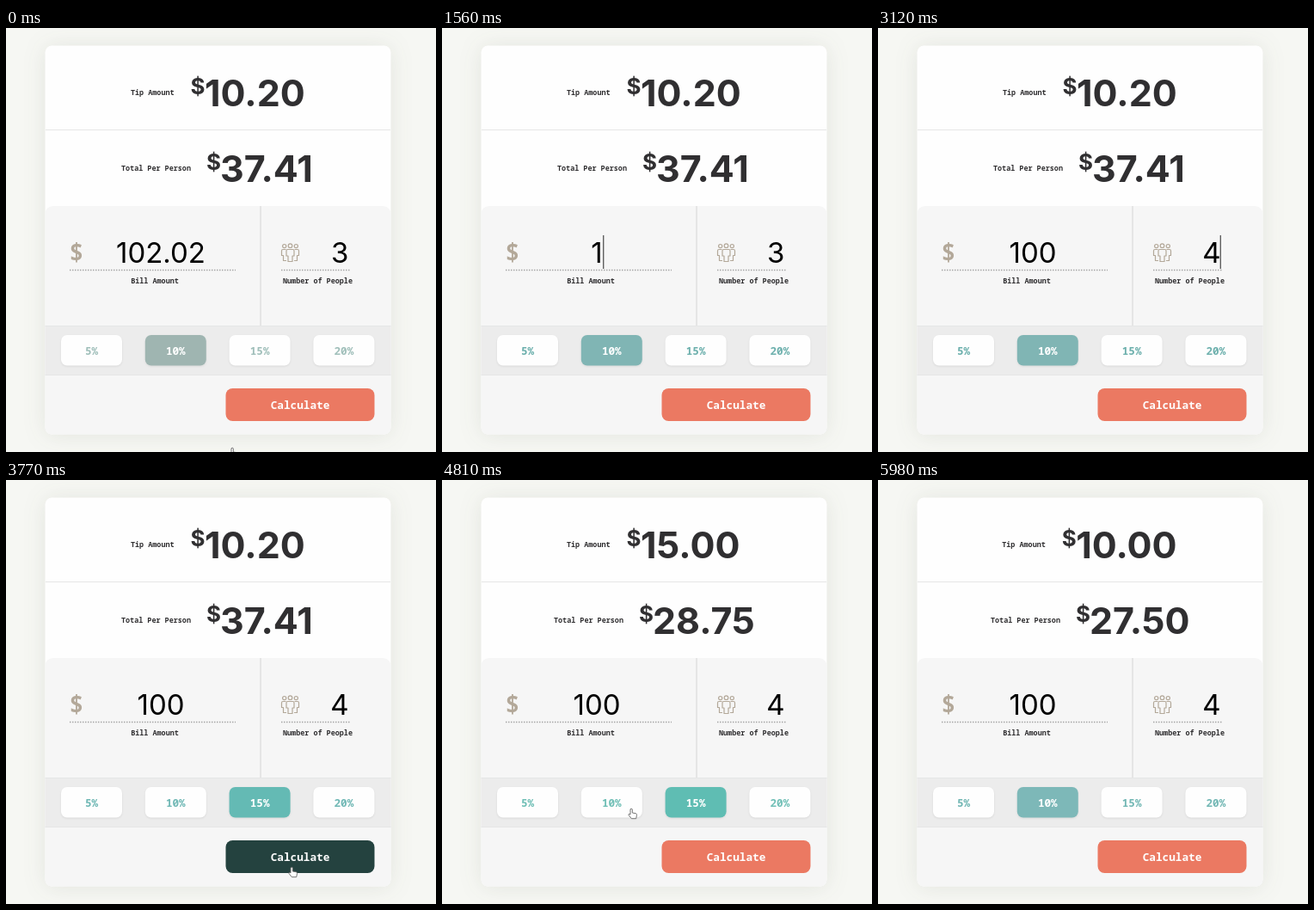
Write an HTML page that moves like this. It is 500 px wide and 493 px high and loops after 6.76 s.

```html
<!DOCTYPE html>
<html lang="en">
<head>
<meta charset="utf-8">
<title>Tip calculator</title>
<style>
  html, body { margin: 0; width: 100%; height: 100%; overflow: hidden; background: #f6f7f3; }
  svg { display: block; width: 100%; height: 100%; }
  text { font-family: "Roboto Mono", "Noto Sans Mono", monospace; font-weight: 700; fill: #302f31; }
  .label { font-size: 8.45px; }
  .sum, .sign, .value { font-family: Inter, sans-serif; }
  .sum { font-size: 43px; }
  .sign { font-size: 26px; }
  .value { font-size: 33px; font-weight: 400; fill: #000; }
  .mid { text-anchor: middle; }
  .end { text-anchor: end; }
  .button { font-size: 12.7px; text-anchor: middle; }
  .card { filter: drop-shadow(0 1px 13px rgba(60, 65, 50, .1)); }
  .tip rect { filter: drop-shadow(0 1px 1px rgba(0, 0, 0, .08)); }
  .dots { stroke: #a5a5a5; stroke-width: 1.5; stroke-dasharray: 1.5 1.5; }
  .icon { fill: none; stroke: #b3a899; stroke-width: 1.2; stroke-linejoin: round; }
</style>
</head>
<body>
<svg viewBox="0 0 500 493" preserveAspectRatio="none">
  <rect class="card" x="45.5" y="20.5" width="402" height="452" rx="8" fill="#fefefe"/>
  <path d="M46 118.5H447" stroke="#e6e6e6"/>
  <path d="M45.5 216a9 9 0 0 1 9-9h384a9 9 0 0 1 9 9V464.500a8 8 0 0 1-8 8h-386a8 8 0 0 1-8-8z" fill="#f6f6f6"/>
  <path d="M296 207V346" stroke="#e5e5e5" stroke-width="2"/>
  <path d="M45.500 346h402v58h-402z" fill="#ececec"/>
  <path d="M45.500 346.500h402M45.500 403.500h402" stroke="#e5e6e6"/>

  <g id="tipRow">
    <text class="label" x="145" y="78">Tip Amount</text>
    <text class="sign" x="214.500" y="76.500">$</text>
    <text class="sum" id="tipSum" x="231" y="91"></text>
  </g>
  <g id="totalRow">
    <text class="label" x="134" y="166">Total Per Person</text>
    <text class="sign" x="233" y="164.500">$</text>
    <text class="sum" id="totalSum" x="249" y="179"></text>
  </g>

  <text x="73.500" y="271" font-size="28" style="fill:#b3a899">$</text>
  <text class="value mid" id="bill" x="180" y="273"></text>
  <path class="dots" d="M74 281.500H267M320 281.500H400"/>
  <text class="label mid" x="173" y="297">Bill Amount</text>

  <g class="icon">
    <circle cx="323.700" cy="253.600" r="2.100"/>
    <circle cx="330.500" cy="253.200" r="2.300"/>
    <circle cx="337.300" cy="253.600" r="2.100"/>
    <path d="M327.500 257.500h6q1.500 0 1.500 1.500v6h-2v6.500h-5v-6.500h-2v-6q0-1.500 1.500-1.500z"/>
    <path d="M325.500 257.500h-3.500q-1.500 0-1.500 1.500v5.500h2v6h3.500M335.500 257.500h3.500q1.500 0 1.500 1.500v5.500h-2v6h-3.500"/>
  </g>
  <text class="value end" id="people" x="398.500" y="273"></text>
  <text class="label mid" x="362.500" y="297">Number of People</text>
  <path id="caret" d="M0 241V280" stroke="#555" stroke-width="1.300"/>

  <g id="tips"></g>
  <rect id="calc" x="255.500" y="419" width="173" height="38" rx="8"/>
  <text class="button" x="342" y="443" style="fill:#fff">Calculate</text>

  <g id="hand">
    <path d="M0 .8q1.300-1.300 2.300 0V5l4 .7q1.300.4 1.200 1.800l-.8 4.200H1.300L-2 7.500q-.3-1.300 1-1.200L0 7z" fill="#fff" stroke="#666" stroke-width=".9" stroke-linejoin="round"/>
  </g>
</svg>
<script>
const LOOP = 6760, STEP = 130;
const el = id => document.getElementById(id);

// Each track lists [start time, value]; a value holds until the next start.
const tracks = {
  bill: [[0, "102.02"], [1560, "1"], [1690, "10"], [1820, "100"]],
  people: [[0, "3"], [3120, "4"]],
  caret: [[0, ""], [1560, "bill"], [2210, ""], [3120, "people"], [3380, ""]],
  percent: [[0, 10], [3510, 15], [4940, 10]],
  result: [
    [0, ["10.20", "37.41", 0, 0]],
    [4030, ["15.00", "28.75", 0, -4]],
    [5720, ["10.00", "27.50", -0.8, -3]]
  ],
  hover: [[0, false], [3640, true], [4680, false], [5590, true], [5850, false]],
  tint: [
    [0, ["#9fb5b1", "#a0bfba"]],
    [650, ["#80b5b4", "#6db0ad"]],
    [3510, ["#64bab4", "#70b8b5"]],
    [4680, ["#5fbdb3", "#70bfb6"]],
    [4940, ["#7db8b8", "#72b7b4"]]
  ]
};

// Pointer stops: [time, x, y]; null hides it.
const stops = [
  [0, 262, 488], [130, null],
  [3380, 295, 378], [3510, 297, 380], [3770, 331, 450],
  [4550, 331, 450], [4810, 219, 382], [5330, 219, 382],
  [5590, 315, 440], [5720, 315, 440], [5850, 270, 476], [5980, null]
];

const at = (track, t) => track.findLast(([start]) => start <= t)[1];

function pointer(t) {
  const i = stops.findLastIndex(s => s[0] <= t);
  const a = stops[i], b = stops[i + 1];
  if (a[1] === null) return null;
  if (!b || b[1] === null) return [a[1], a[2]];
  const k = (t - a[0]) / (b[0] - a[0]);
  return [1, 2].map(n => a[n] + (b[n] - a[n]) * k);
}

const percents = [5, 10, 15, 20];
el("tips").innerHTML = percents.map((p, i) => {
  const x = 64 + i * 97.8;
  return `<g class="tip"><rect x="${x}" y="357" width="71" height="35.5" rx="7"/>
    <text class="button" x="${x + 35.5}" y="379.5">${p}%</text></g>`;
}).join("");
const buttons = [...document.querySelectorAll(".tip")];

function setText(id, value) {
  if (el(id).textContent !== value) el(id).textContent = value;
}

function draw(time) {
  const t = Math.floor(time % LOOP / STEP) * STEP;
  const now = Object.fromEntries(Object.entries(tracks).map(([k, v]) => [k, at(v, t)]));
  const [tip, total, tipShift, totalShift] = now.result;
  setText("tipSum", tip);
  setText("totalSum", total);
  setText("bill", now.bill);
  setText("people", now.people);
  el("tipRow").setAttribute("transform", `translate(${tipShift})`);
  el("totalRow").setAttribute("transform", `translate(${totalShift})`);

  const caretX = now.caret === "bill" ? 181 + el("bill").getComputedTextLength() / 2 : 398.3;
  el("caret").setAttribute("transform", `translate(${caretX})`);
  el("caret").style.display = now.caret ? "" : "none";

  const [fill, ink] = now.tint;
  buttons.forEach((b, i) => {
    const on = percents[i] === now.percent;
    b.children[0].style.fill = on ? fill : "#fefefe";
    b.children[1].style.fill = on ? "#fff" : ink;
  });
  el("calc").style.fill = now.hover ? "#24423f" : "#eb7962";

  const p = pointer(t);
  el("hand").style.display = p ? "" : "none";
  if (p) el("hand").setAttribute("transform", `translate(${p})`);
}

const begin = performance.now();
function tick() {
  draw(performance.now() - begin);
  requestAnimationFrame(tick);
}
tick();
</script>
</body>
</html>
```
